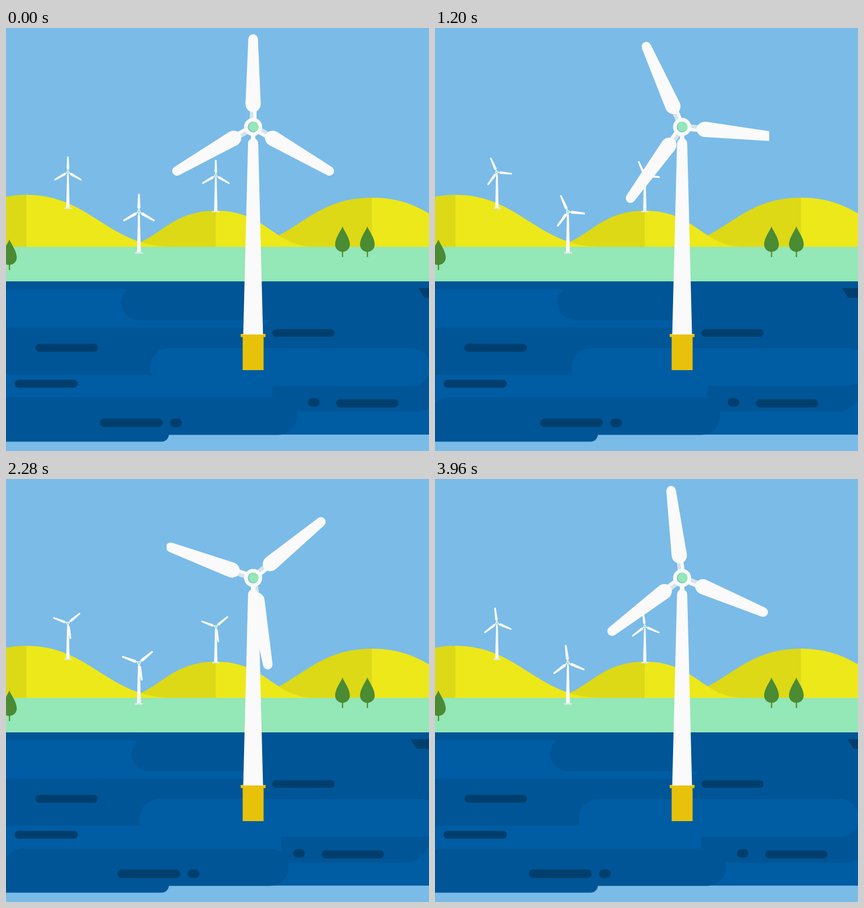
An HTML page with a canvas that plays this animation: 748x748 px, repeating every 4 s.

```html
<!DOCTYPE html>
<html lang="en">
<head>
<meta charset="utf-8">
<title>Offshore wind</title>
<style>
  html, body { margin: 0; width: 100%; height: 100%; overflow: hidden; background: #7abbe8; }
  canvas { display: block; width: 748px; height: 748px; }
</style>
</head>
<body>
<canvas width="748" height="748"></canvas>
<script>
const ctx = document.querySelector('canvas').getContext('2d');
const LOOP = 4000, STEP = 40;
const SKY = '#7abbe8', GRASS = '#94e7b6', HILL_LIGHT = '#ede81a', HILL_DARK = '#ddd916';
const SEA = '#005596', SEA_LIGHT = '#005ca3', SEA_DEEP = '#003f6d';
const WHITE = '#fafafa', SHADE = '#d3e4ea', YELLOW = '#e8c20a';

const BLADE = new Path2D('M-8.5-155A8.5 9 0 0 1 8.5-155L13.5-41A13.5 15 0 0 1-13.5-41Z');
const TOWER = new Path2D('M-9 29C-8 17 8 17 9 29L17.5 367H-17.5Z');
const TREE = new Path2D('M0 0C3 8 13 20 13 32C13 40 6 45 0 45C-6 45-13 40-13 32C-13 20-3 8 0 0Z');
const HILLS = [
  { peak: 647, left: 'M400 387C510 387 530 300 647 300V387Z', right: 'M647 387V300C764 300 784 387 894 387Z' },
  { peak: 371, left: 'M197 387C267 387 282 323 371 323V387Z', right: 'M371 387V323C460 323 475 387 545 387Z' },
  { peak: 36, left: 'M-223 387C-108 387-78 295 36 295V387Z', right: 'M36 387V295C150 295 180 387 295 387Z' }
].map(h => [new Path2D(h.left), new Path2D(h.right)]);

function rect(color, x, y, w, h) {
  ctx.fillStyle = color;
  ctx.fillRect(x, y, w, h);
}

function shape(color, path) {
  ctx.fillStyle = color;
  ctx.fill(path);
}

function pill(color, x1, x2, y1, y2, radius = (y2 - y1) / 2) {
  ctx.fillStyle = color;
  ctx.beginPath();
  ctx.roundRect(x1, y1, x2 - x1, y2 - y1, radius);
  ctx.fill();
}

function disc(color, x, y, r) {
  ctx.fillStyle = color;
  ctx.beginPath();
  ctx.arc(x, y, r, 0, 2 * Math.PI);
  ctx.fill();
}

function at(x, y, scale, draw) {
  ctx.save();
  ctx.translate(x, y);
  ctx.scale(scale, scale);
  draw();
  ctx.restore();
}

function tree(x, y) {
  at(x, y, 1, () => {
    rect('#5f8a2a', -1, 43, 2.2, 11);
    shape('#4a8b33', TREE);
  });
}

function rotor(angle) {
  ctx.save();
  // The rotor's frame is narrower than its full sweep.
  ctx.beginPath();
  ctx.rect(-153, -180, 307, 360);
  ctx.clip();
  ctx.rotate(angle);
  for (let i = 0; i < 3; i++) {
    rect(SHADE, -6, -30, 6, 22);
    rect(WHITE, 0, -30, 6, 22);
    shape(WHITE, BLADE);
    ctx.rotate(2 * Math.PI / 3);
  }
  ctx.restore();
}

function turbine(x, y, scale, angle, drawBase) {
  at(x, y, scale, () => {
    rotor(angle);
    drawBase();
    rect(WHITE, -4, 10, 8, 18);
    shape(WHITE, TOWER);
    disc(WHITE, 0, 0, 16);
    disc('#7cc4d0', 0, 0, 9.5);
    disc(GRASS, 1, -0.5, 8.5);
  });
}

function plate() {
  rect('#dce8ec', -37, 366, 74, 14);
}

function pile() {
  rect(YELLOW, -18.5, 369, 37, 61);
  rect(YELLOW, -22, 366, 44, 5.5);
}

function land() {
  rect(SKY, 0, 0, 748, 748);
  for (const [left, right] of HILLS) {
    shape(HILL_DARK, left);
    shape(HILL_LIGHT, right);
  }
  rect(GRASS, 0, 387, 748, 61);
  tree(595, 351);
  tree(639, 351);
  tree(6, 374);
}

function sea(sway, drift) {
  rect(SEA, 0, 448, 748, 271);
  pill(SEA, -40, 288, 690, 731.5, 13);

  pill(SEA_LIGHT, -60, 474 - 19 * sway, 462, 530);
  pill(SEA, 204 + 19 * sway, 800, 455, 516.5);

  // Hull edge entering from the right
  const hull = 729 - 14.5 * sway;
  ctx.fillStyle = SEA_DEEP;
  ctx.beginPath();
  ctx.moveTo(hull, 460);
  ctx.lineTo(760, 460);
  ctx.lineTo(760, 477);
  ctx.lineTo(hull + 11, 477);
  ctx.fill();

  rect(SEA_LIGHT, 470, 652, 278, 66.5);
  pill(SEA, 400, 766 - 20 * sway, 633, 678.5, [0, 0, 41, 0]);
  pill(SEA_LIGHT, 255 - 19.5 * sway, 750 + 19 * sway, 566, 633, [33, 33, 33, 0]);
  pill(SEA_LIGHT, -40, 471 + 16.5 * sway, 613, 660, [0, 8, 8, 0]);
  rect(SEA_LIGHT, -2, 650, 60, 30);
  pill(SEA, -22 + 19 * sway, 514.5 - 15.5 * sway, 653.5, 719.5);
  rect(SEA, 0, 686, 60, 33);

  pill(SEA_DEEP, 471, 581, 532.5, 546);
  pill(SEA_DEEP, 52, 162.5, 558.5, 572.5);
  pill(SEA_DEEP, 15, 127, 622, 636);
  const ahead = 32 * drift, back = -26.5 * drift;
  pill(SEA_DEEP, 166 + ahead, 277 + ahead, 690.5, 705.5);
  pill(SEA_DEEP, 290 + ahead, 311 + ahead, 690.5, 705.5);
  pill(SEA_DEEP, 584 + back, 694 + back, 656.5, 671);
  pill(SEA_DEEP, 534 + back, 554.5 + back, 654.5, 669.5);
}

// Smooth 0 -> 1 -> 0, turning back at `peak` ms
function swing(t, peak) {
  const p = t < peak ? t / peak : (LOOP - t) / (LOOP - peak);
  return (1 - Math.cos(Math.PI * p)) / 2;
}

function draw(now) {
  const t = Math.floor((now % LOOP) / STEP) * STEP;
  const angle = 4 * Math.PI * t / LOOP;
  land();
  sea(swing(t, 2000), swing(t, 2080));
  turbine(109.5, 255, 0.171, angle, plate);
  turbine(235, 325, 0.195, angle, plate);
  turbine(371, 261, 0.171, angle, plate);
  turbine(437, 175, 1, angle, pile);
}

let start;
function frame(now) {
  start ??= now;
  draw(now - start);
  requestAnimationFrame(frame);
}
requestAnimationFrame(frame);
</script>
</body>
</html>
```
